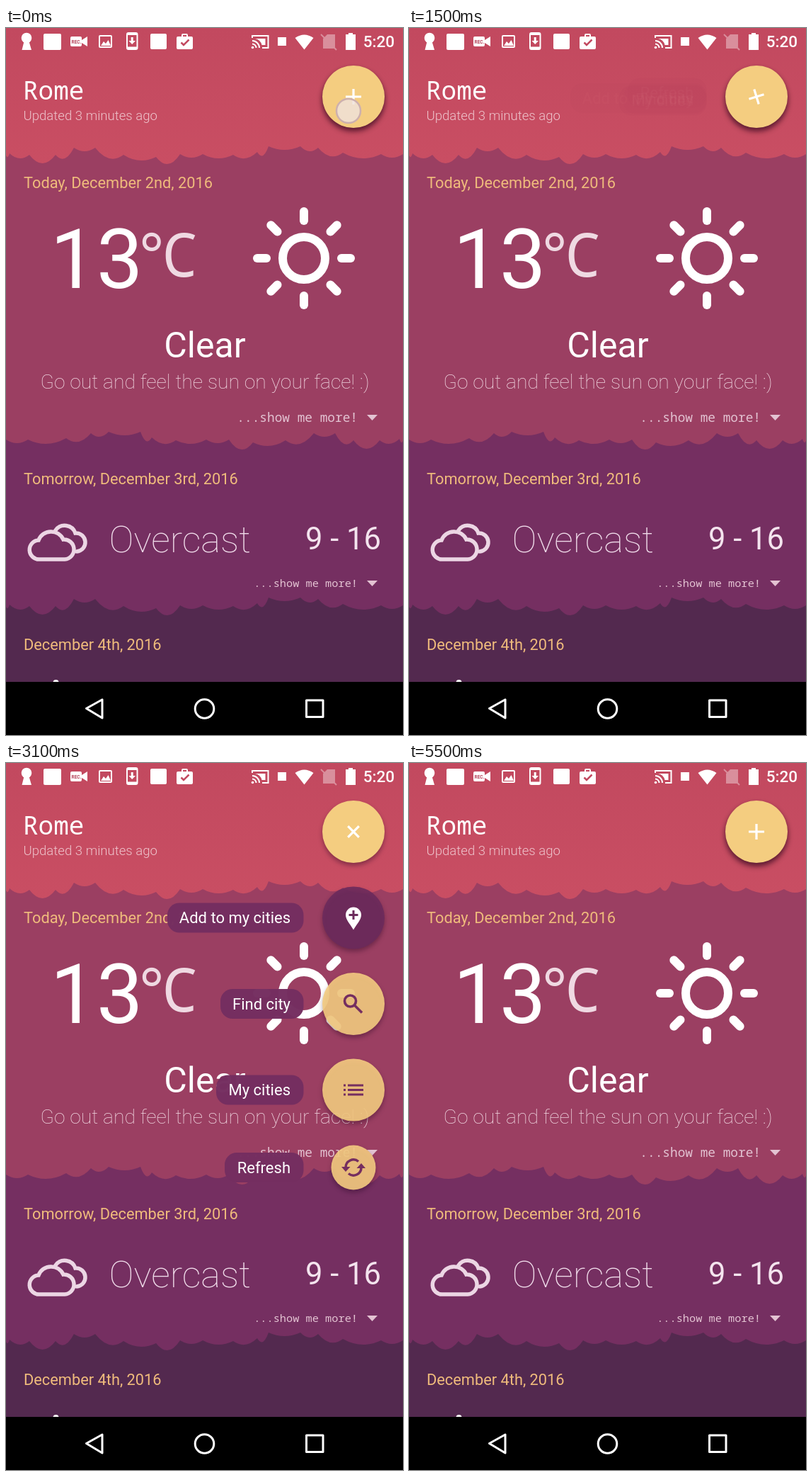
Animation of 561x998 px, one loop 5600 ms. Source, as an HTML page:

```html
<!DOCTYPE html>
<html lang="en">
<head>
<meta charset="utf-8">
<title>Weather menu</title>
<style>
  html, body { margin: 0; height: 100%; overflow: hidden; background: #000; }
  svg { display: block; width: 100vw; height: 100vh; }
  text { font-family: Roboto, sans-serif; fill: #fff; white-space: pre; }
  .mono { font-family: "Noto Sans Mono", monospace; font-weight: 300; }
  .thin { font-weight: 100; }
  .date { font-size: 21.8px; fill: #efbb7c; }
  .soft { fill: #e3c3d2; }
  .end { text-anchor: end; }
  .mid { text-anchor: middle; }
  .line { fill: none; stroke: #fff; }
  .disc { filter: drop-shadow(0 4px 3px rgba(30, 0, 30, .38)); }
</style>
</head>
<body>
<svg viewBox="0 0 561 998">
  <defs>
    <linearGradient id="sky" x2="0" y2="1">
      <stop stop-color="#c2495f"/><stop offset="1" stop-color="#c94e63"/>
    </linearGradient>
    <filter id="blur" x="-30%" y="-30%" width="160%" height="160%"><feGaussianBlur stdDeviation="4"/></filter>
  </defs>

  <rect width="561" height="998" fill="#53294f"/>
  <g id="bands"></g>

  <!-- status bar -->
  <g fill="#fff">
    <path d="M25.500 19L22.500 31H36L32.500 19z"/><circle cx="29" cy="14" r="7.300"/>
    <rect x="53" y="8" width="25" height="23" rx="2"/>
    <path d="M93 12H105Q107 12 107 14V17L115 12V26L107 21V24Q107 26 105 26H93Q91 26 91 24V14Q91 12 93 12z"/>
    <text x="92.500" y="21.500" font-size="6.500" font-weight="700" style="fill:#b8465d">REC.</text>
    <path d="M134 25L138 19L141 22L144.500 17L148 25z"/>
    <path d="M176.700 13H179.700V18H183L178.200 23L173.400 18H176.700z"/>
    <rect x="204" y="8" width="23" height="22" rx="2"/>
    <path fill-rule="evenodd" d="M243 12H248V10Q248 8 250 8H255Q257 8 257 10V12H262Q264 12 264 14V28Q264 30 262 30H243Q241 30 241 28V14Q241 12 243 12zM250 10V12H255V10z"/>
    <rect x="384" y="13" width="12" height="12"/>
    <path d="M421.500 30.500L408.500 14Q421.500 5 434.500 14z"/>
    <path d="M484 9V7H490V9H494V31H480V9z"/>
  </g>
  <g class="line" stroke-width="2">
    <rect x="132" y="11" width="17" height="16" rx="1"/>
    <rect x="171" y="7" width="14.500" height="23" rx="2"/>
    <path d="M171 8.500H185.500M171 28H185.500" stroke-width="3"/>
    <path d="M247.500 20.500L251 24L258.500 16.500" stroke="#c2495f" stroke-width="2.500"/>
    <path d="M348 14V11H370.500V28H362M348 18A10 10 0 0 1 358 28M348 22.500A5.500 5.500 0 0 1 353.500 28"/>
    <path d="M352 15H366.500V24H361.500A12 12 0 0 0 352 15" fill="#fff" stroke="none"/>
  </g>
  <g opacity=".38"><path d="M448 15L454 9H465V29H448z" fill="#fff"/><path d="M445 9L467 31" class="line" stroke-width="2"/></g>
  <circle cx="348.500" cy="27.500" r="1.800" fill="#fff"/>
  <text x="549" y="27" class="end" font-size="22.500" font-weight="500">5:20</text>

  <!-- header -->
  <text x="24" y="101" class="mono" font-size="36">Rome</text>
  <text x="24.500" y="130" font-size="18.600" font-weight="300" style="fill:#eec3cb">Updated 3 minutes ago</text>

  <!-- today -->
  <text x="25" y="226" class="date">Today, December 2nd, 2016</text>
  <text x="62.500" y="367" font-size="116.500">13</text>
  <text x="180 220" y="351" class="mono" font-size="86" style="fill:#efd9e2;font-weight:400">°C</text>
  <g id="sun" class="line" stroke-width="12" stroke-linecap="round" transform="translate(421 325)"><circle r="30"/></g>
  <text x="281" y="465" class="mid" font-size="50">Clear</text>
  <text x="281" y="509" class="mid thin" font-size="28.300" style="fill:#f3dbe4">Go out and feel the sun on your face! :)</text>
  <text x="497" y="556" class="mono soft end" font-size="17.800">...show me more!</text>
  <path class="soft" d="M510 546H525L517.500 554z"/>

  <!-- tomorrow -->
  <text x="25" y="644" class="date">Tomorrow, December 3rd, 2016</text>
  <g fill="none" stroke="#ecd6e4" stroke-width="5.500" stroke-linecap="round">
    <path d="M47.500 750A13.500 13.500 0 0 1 46 723A19 19 0 0 1 81 722A14 14 0 0 1 83 750z"/>
    <path d="M70 709A16 16 0 0 1 98 713A13 13 0 0 1 100 739"/>
  </g>
  <text x="145.500" y="740" class="thin" font-size="52.500" style="fill:#f0dcea">Overcast</text>
  <text x="530" y="736" class="end" font-size="43.500" style="fill:#f4e4ee">9 - 16</text>
  <text x="497" y="789" class="mono soft end" font-size="15.300">...show me more!</text>
  <path class="soft" d="M510 780H525L517.500 788z"/>

  <text x="25" y="878" class="date">December 4th, 2016</text>
  <circle cx="70.500" cy="924" r="4" fill="#fff"/>

  <!-- navigation bar -->
  <rect y="923" width="561" height="75"/>
  <g class="line" stroke-width="3" stroke-linejoin="round">
    <path d="M113.500 960.500L136 948V974z"/>
    <circle cx="280.500" cy="961" r="13.300"/>
    <rect x="424.500" y="949" width="23.500" height="23.500"/>
  </g>

  <!-- floating menu -->
  <g id="items"></g>
  <circle id="shade" cx="491" cy="102" r="44" fill="#300018" filter="url(#blur)"/>
  <circle cx="491" cy="97" r="44" fill="#f4cd80" class="disc"/>
  <path id="plus" d="M-11 0H11M0 -11V11" class="line" stroke-width="3.200"/>
  <circle id="touch" r="17" fill="#f0e2dc" fill-opacity=".82" stroke="#cdb0ae" stroke-width="2.500"/>
</svg>

<script>
const $ = id => document.getElementById(id);
const LOOP = 5600, STEP = 100, DURATION = 300, FAB_Y = 97;

// Scalloped edge: right end and lowest point of each bump
const bumps = [[5, 182], [33, 184], [70, 191], [96, 184], [126, 174], [166, 184],
  [212, 187], [246, 192], [278, 183], [321, 184], [355, 184], [371, 180], [416, 172],
  [441, 174], [476, 181], [530, 184], [561, 183]];

function band(dy, mirror, fill) {
  const px = x => mirror ? 561 - x : x;
  let x = 0, y = 180 + dy, d = `M${px(0)} 0V${y}`;
  bumps.forEach(([end, low], i) => {
    const next = bumps[i + 1];
    const cusp = dy + Math.min(low, next ? next[1] : low) - 5;
    d += `Q${px((x + end) / 2)} ${2 * (low + dy) - (y + cusp) / 2} ${px(end)} ${cusp}`;
    x = end;
    y = cusp;
  });
  return `<path d="${d}V0z" fill="${fill}"/>`;
}
$('bands').innerHTML = band(637, false, '#752f61') + band(403, true, '#9b3f62') + band(0, false, 'url(#sky)');

for (let a = 0; a < 360; a += 45)
  $('sun').innerHTML += `<path d="M0 -53V-66" transform="rotate(${a})"/>`;

const PURPLE = '#752e60', GOLD = '#f4cb81';
const items = [
  { label: 'Add to my cities', left: 228, y: 218.5, r: 44, fill: '#6c2b5c',
    icon: `<path d="M0 17C-3 11 -11 3 -11 -4A11 11 0 0 1 11 -4C11 3 3 11 0 17z" fill="#fff"/>
      <path d="M-6.500 -4H6.500M0 -10.500V2.500" stroke="#6c2b5c" stroke-width="3"/>` },
  { label: 'Find city', left: 303, y: 340, r: 44, fill: GOLD,
    icon: `<g fill="none" stroke="${PURPLE}" stroke-width="3.600"><circle cx="-4.500" cy="-4" r="8"/><path d="M1.500 2L12 12.500"/></g>` },
  { label: 'My cities', left: 297, y: 461.5, r: 44, fill: GOLD,
    icon: `<path d="M-14 -6.500h3m3 0H14M-14 0h3m3 0H14M-14 6.500h3m3 0H14" stroke="${PURPLE}" stroke-width="3"/>` },
  { label: 'Refresh', left: 309, y: 571, r: 31.5, fill: GOLD,
    icon: `<path d="M7 -8.500A11 11 0 0 0 -11 0M-7 8.500A11 11 0 0 0 11 0" fill="none" stroke="${PURPLE}" stroke-width="3.500"/>
      <path d="M-4.500 -1H-17L-11 6zM4.500 1H17L11 -6z" fill="${PURPLE}"/>` }
];
$('items').innerHTML = items.map(({ label, left, r, fill, icon }) => `<g>
  <rect x="${left}" y="-21" width="${420.5 - left}" height="42" rx="17" fill="${PURPLE}" fill-opacity=".98"/>
  <text x="402" y="7.500" class="end" font-size="22">${label}</text>
  <g transform="translate(491 0)"><circle r="${r}" fill="${fill}" fill-opacity=".9" class="disc"/>${icon}</g></g>`).join('');
const nodes = [...$('items').children];

const moves = [[65, true], [1349, false], [2765, true], [3949, false]];
// start, fade, end, x, y
const touches = [[0, 100, 200, 484, 117], [1200, 1400, 1500, 507, 102],
  [2600, 2800, 2900, 500, 93], [3900, 4000, 4100, 503, 99]];

const overshoot = k => { const u = k - 1; return u * u * (3 * u + 2) + 1; };

function menuAt(t) {
  const move = moves.filter(m => m[0] <= t).pop();
  if (!move) return { pos: 0, alpha: 0, turn: 0 };
  const k = Math.min(1, (t - move[0]) / DURATION), over = overshoot(k);
  if (move[1]) return { pos: over, alpha: 1 - (1 - k) ** 2, turn: over };
  const rest = (1 - k) ** 6;
  return { pos: rest, alpha: rest, turn: 1 - over };
}

function draw(now) {
  const t = Math.floor(now % LOOP / STEP) * STEP;
  const { pos, alpha, turn } = menuAt(t);
  items.forEach(({ y, r }, i) => {
    const home = FAB_Y - 44 + r;  // tops line up when closed
    nodes[i].setAttribute('transform', `translate(0 ${home + (y - home) * pos})`);
    nodes[i].setAttribute('opacity', alpha);
  });
  $('shade').setAttribute('opacity', .45 * (1 - alpha));
  $('plus').setAttribute('transform', `translate(491 ${FAB_Y}) rotate(${135 * turn})`);

  const touch = touches.find(([start, , end]) => t >= start && t < end);
  $('touch').setAttribute('opacity', touch ? (t < touch[1] ? 1 : .4) : 0);
  if (touch) $('touch').setAttribute('transform', `translate(${touch[3]} ${touch[4]})`);
}

const begin = performance.now();
(function tick() {
  draw(performance.now() - begin);
  requestAnimationFrame(tick);
})();
</script>
</body>
</html>
```
